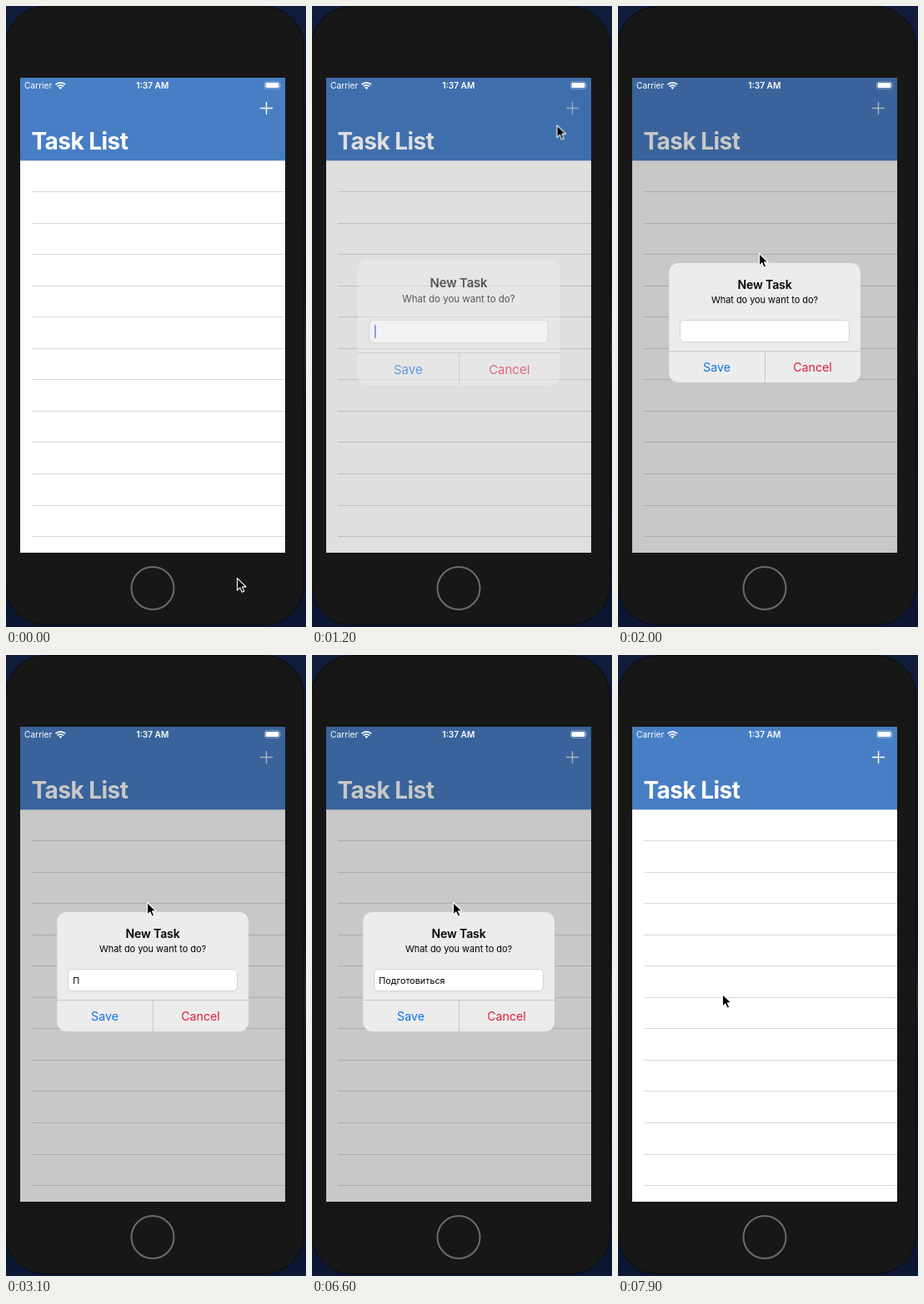
An HTML page that plays this animation: 360 by 744 pixels, repeating every 8000 ms.

```html
<!DOCTYPE html>
<html lang="en">
<head>
<meta charset="utf-8">
<title>Task List</title>
<style>
html, body { margin: 0; width: 100%; height: 100%; overflow: hidden; background: #0b1428; }
svg { display: block; width: 360px; height: 744px; font-family: Inter, Roboto, sans-serif; }
.anim { animation: 8s linear infinite; }
#cursor { animation-name: move; }
#dim { animation-name: dim; }
#plus { animation-name: press; }
#alert { animation-name: alert; transform-origin: 176px 379.5px; }
.mid { text-anchor: middle; }

@keyframes move {
  0%, 1.25% { transform: translate(277px, 685px); animation-timing-function: ease-in-out; }
  12.5%, 13.9% { transform: translate(313px, 120px); animation-timing-function: ease-in; }
  16.25% { transform: translate(245px, 198px); animation-timing-function: ease-out; }
  21.25%, 86.25% { transform: translate(169px, 296px); animation-timing-function: ease-in-out; }
  94.5%, 96.5% { transform: translate(117px, 425px); animation-timing-function: ease-out; }
  98.75%, 100% { transform: translate(125px, 406px); }
}
@keyframes dim {
  0%, 14% { opacity: 0; animation-timing-function: ease-out; }
  16.5%, 96.5% { opacity: 1; }
  98.75%, 100% { opacity: 0; }
}
@keyframes press {
  0%, 13.2% { opacity: 1; }
  13.4%, 14% { opacity: .25; }
  16%, 96.5% { opacity: .8; }
  98.75%, 100% { opacity: 1; }
}
@keyframes alert {
  0%, 14% { opacity: 0; transform: scale(1.12); animation-timing-function: ease-out; }
  16.25% { opacity: .97; transform: scale(1.018); animation-timing-function: ease-out; }
  18.75%, 96.5% { opacity: 1; transform: none; }
  98.6%, 100% { opacity: 0; transform: none; }
}
</style>
</head>
<body>
<svg viewBox="0 0 360 744">
  <defs>
    <linearGradient id="sky" x2="0" y2="1">
      <stop offset="0" stop-color="#101d3c"/>
      <stop offset=".45" stop-color="#0c1220"/>
      <stop offset=".55" stop-color="#25272e"/>
      <stop offset=".65" stop-color="#0c1220"/>
      <stop offset="1" stop-color="#0b1733"/>
    </linearGradient>
  </defs>
  <rect width="360" height="744" fill="url(#sky)"/>
  <rect x="-.5" y=".5" width="358" height="741" rx="48" fill="#171717" stroke="#0a0a0a"/>
  <circle cx="176" cy="697.5" r="25.5" fill="none" stroke="#6c6c6c" stroke-width="2"/>

  <rect x="17" y="86" width="318" height="569" fill="#fff"/>
  <path id="rows" stroke="#d9d9d9"/>
  <rect x="17" y="86" width="318" height="99.3" fill="#487ec4"/>
  <text x="30.5" y="171.5" font-size="28" font-weight="700" letter-spacing="-.55" fill="#fff">Task List</text>
  <path id="plus" class="anim" d="M305 122.5h15M312.5 115v15" stroke="#fff" stroke-width="1.4"/>
  <rect id="dim" class="anim" x="17" y="86" width="318" height="569" fill="#000" fill-opacity=".215"/>

  <g fill="#fff" font-size="10.2">
    <text x="22" y="98.8">Carrier</text>
    <text class="mid" x="175.8" y="98.8" font-weight="600">1:37 AM</text>
    <g fill="none" stroke="#fff" stroke-width="1.7">
      <path d="M59.6 94.2a8.2 8.2 0 0 1 11.6 0M61.7 96.5a5.2 5.2 0 0 1 7.4 0"/>
    </g>
    <path d="M65.4 100l-2-2.2a2.8 2.8 0 0 1 4 0z"/>
    <rect x="310.4" y="90.9" width="18.2" height="8.4" rx="2.3" fill="none" stroke="#fff" stroke-opacity=".5" stroke-width=".8"/>
    <rect x="311.6" y="92.1" width="15.8" height="6" rx="1.4"/>
    <path d="M329.7 93.6q1.4 1.5 0 3z" fill-opacity=".6"/>
  </g>

  <g id="alert" class="anim">
    <rect x="61.3" y="308" width="229.6" height="143" rx="11" fill="#ececec"/>
    <text class="mid" x="176" y="338.9" font-size="14.1" font-weight="600" letter-spacing="-.15">New Task</text>
    <text class="mid" x="176" y="355.9" font-size="11" letter-spacing="-.05">What do you want to do?</text>
    <rect x="74.5" y="376.5" width="203" height="26" rx="5" fill="#fff" stroke="#c9c9cb" stroke-width=".8"/>
    <text id="field" x="80.3" y="394" font-size="10.8"></text>
    <rect id="caret" y="382" width="1.6" height="15" fill="#4257dc"/>
    <path d="M61.3 413.5h229.6M176.5 413.5v37.5" stroke="#c8c8ca"/>
    <text class="mid" x="118.5" y="437.5" font-size="14.2" fill="#0f71e6">Save</text>
    <text class="mid" x="233.5" y="437.5" font-size="14.2" fill="#e21b39">Cancel</text>
  </g>

  <path id="cursor" class="anim" d="M.5 .5v14.6l3.4-3.2 2.3 5.4 2.6-1.1-2.3-5.3h4.6z" fill="#000" stroke="#fff" stroke-width="1.1" stroke-linejoin="round"/>
</svg>
<script>
const $ = id => document.getElementById(id);
const LOOP = 8000;
const word = "Подготовиться";
const keys = [2900, 4100, 4300, 4500, 4700, 4900, 5000, 5300, 5450, 5600, 5800, 6000, 6200];
const caretOn = [[1100, 1750], [2250, 3050], [3550, 6550]];

$("rows").setAttribute("d", Array.from({ length: 12 }, (_, i) =>
  `M31 ${Math.round(222 + i * 37.55) + .5}H335`).join(""));

let start, shown = -1;
function draw(now) {
  start ??= now;
  const t = (now - start) % LOOP;
  const n = keys.filter(k => k <= t).length;
  if (n !== shown) {
    const field = $("field");
    field.textContent = word.slice(0, n);
    $("caret").setAttribute("x", n ? 80.3 + field.getComputedTextLength() : 80.3);
    shown = n;
  }
  const on = caretOn.some(([a, b]) => t >= a && t < b);
  $("caret").setAttribute("visibility", on ? "visible" : "hidden");
  requestAnimationFrame(draw);
}
requestAnimationFrame(draw);
</script>
</body>
</html>
```
